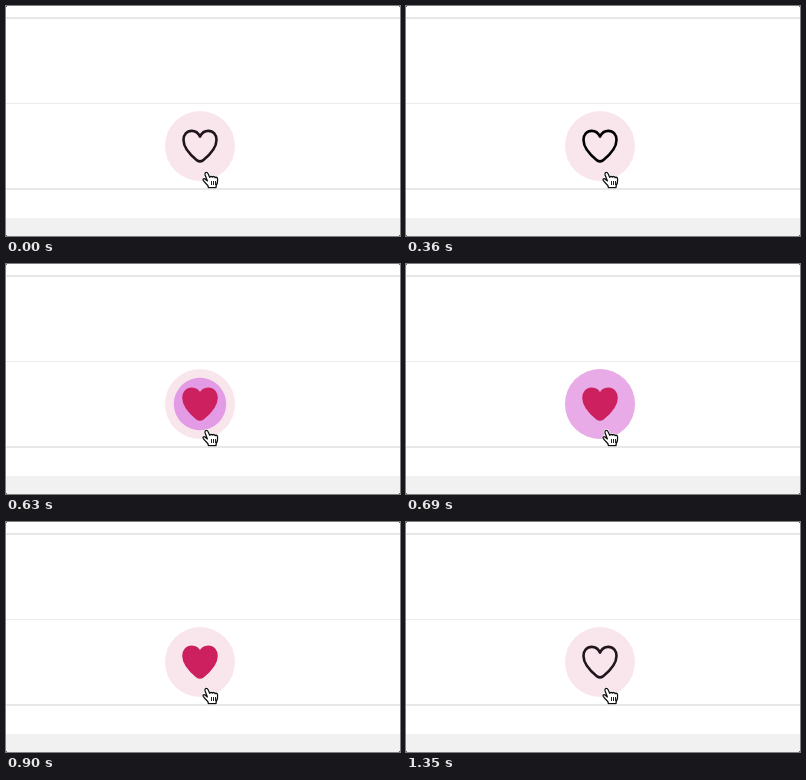
Write an HTML page with a canvas that moves like this. It is 394 px wide and 230 px high and loops after 1650 ms.

```html
<!DOCTYPE html>
<html lang="en">
<head>
<meta charset="utf-8">
<title>Like button</title>
<style>
  html, body { margin: 0; width: 100%; height: 100%; overflow: hidden; background: #fff; }
  canvas { display: block; width: 394px; height: 230px; }
</style>
</head>
<body>
<canvas id="stage"></canvas>
<script>
const W = 394, H = 230, LOOP = 1650, STEP = 30;
const canvas = document.getElementById('stage');
const ctx = canvas.getContext('2d');
const ratio = window.devicePixelRatio || 1;
canvas.width = W * ratio;
canvas.height = H * ratio;
ctx.scale(ratio, ratio);

const button = { x: 194, y: 140, r: 35 };
const pointer = { x: 202.3, y: 166, r: 30.5 };

const heart = new Path2D(
  'M194 130.6 C192.2 126.8 188.9 124.9 185.7 124.9 C180.8 124.9 177.5 128.7 177.5 133.9' +
  ' C177.5 142.8 185.4 149.8 191.1 154.4 Q194 156.5 196.9 154.4' +
  ' C202.6 149.8 210.5 142.8 210.5 133.9 C210.5 128.7 207.2 124.9 202.3 124.9' +
  ' C199.1 124.9 195.8 126.8 194 130.6 Z');

const hand = new Path2D(
  'M202.5 181.7 L201.8 179.5 C200.2 177.9 198.3 175.9 197.2 174.3' +
  ' C196.5 173 197.8 172.2 199 173 L201.4 174.9' +
  ' L199 168.7 C198.5 166.2 201.2 165.6 202 167.6 L203.7 171.3' +
  ' C204.4 170.1 206 170.2 206.4 171.2 C207.3 170.1 208.8 170.4 209.1 171.6' +
  ' C210.2 170.8 211.4 171.5 211.6 173 C211.9 175.6 211.4 177.5 210.2 179.6' +
  ' L210 181.7 Z');

const clamp = v => Math.max(0, Math.min(1, v));
const progress = (t, from, to) => clamp((t - from) / (to - from));
const within = (t, from, to) => t >= from && t < to;

function rect(x, y, w, h, color) {
  ctx.fillStyle = color;
  ctx.fillRect(x, y, w, h);
}

function disc(r, color) {
  ctx.fillStyle = color;
  ctx.beginPath();
  ctx.arc(button.x, button.y, r, 0, Math.PI * 2);
  ctx.fill();
}

function stroke(path, color, width) {
  ctx.strokeStyle = color;
  ctx.lineWidth = width;
  ctx.stroke(path);
}

function drawPage() {
  rect(0, 0, W, H, '#fff');
  rect(0, 11, W, 2, '#e7e7e7');
  rect(0, 97, W, 1, '#ebebeb');
  rect(0, 182, W, 2, '#e8e8e8');
  rect(0, 212, W, 18, '#f1f1f1');
  for (const x of [0, W - 1]) {
    rect(x, 0, 1, 1, '#666');
    rect(x, H - 1, 1, 1, '#666');
  }
}

function drawPulse(t) {
  if (!within(t, 450, 900)) return;
  ctx.globalAlpha = Math.pow(1 - progress(t, 660, 900), 1.8);
  disc(button.r * progress(t, 450, 690), '#e39be6');
  ctx.globalAlpha = 1;
}

function drawHeart(t) {
  const liked = within(t, 390, 1350);
  const color = liked ? '#cc205f' : within(t, 180, 390) ? '#000' : '#21151d';
  if (liked) {
    ctx.fillStyle = color;
    ctx.fill(heart);
  }
  stroke(heart, color, 2.6);
}

function drawRing(t) {
  if (!within(t, 180, 360) && !within(t, 1260, 1320)) return;
  const ring = new Path2D();
  ring.arc(pointer.x, pointer.y, pointer.r, 0, Math.PI * 2);
  stroke(ring, 'rgba(255,255,255,0.85)', 3.2);
  stroke(ring, '#000', 1.6);
}

function drawHand() {
  stroke(hand, '#fff', 2.6);
  ctx.fillStyle = '#fff';
  ctx.fill(hand);
  stroke(hand, '#111', 1.3);
  for (const x of [205, 207, 209]) rect(x, 175, 1, 4, '#222');
}

function draw(now) {
  const t = Math.floor((now % LOOP) / STEP) * STEP;
  drawPage();
  disc(button.r, '#f9e6ec');
  drawPulse(t);
  drawHeart(t);
  drawRing(t);
  drawHand();
}

ctx.lineJoin = 'round';
let start;
function tick(now) {
  if (start === undefined) start = now;
  draw(now - start);
  requestAnimationFrame(tick);
}
draw(0);
requestAnimationFrame(tick);
</script>
</body>
</html>
```
